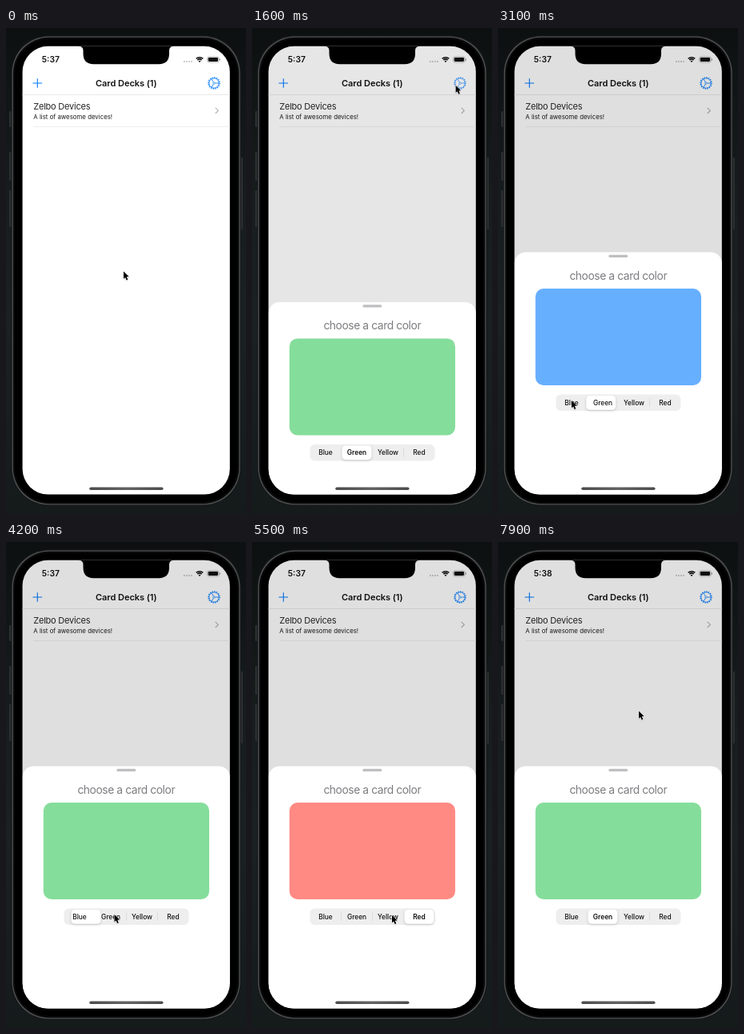
These frames come from a looping animation (300 px wide and 608 px high, 8000 ms). An HTML page with a canvas:

```html
<!DOCTYPE html>
<html lang="en">
<head>
<meta charset="utf-8">
<title>Card Decks</title>
<style>
html, body { margin: 0; width: 100%; height: 100%; overflow: hidden; background: #0c1011; }
canvas { display: block; width: 300px; height: 608px; }
</style>
</head>
<body>
<canvas id="stage"></canvas>
<script>
const W = 300, H = 608, LOOP = 8000;
const canvas = document.getElementById('stage');
const ctx = canvas.getContext('2d');
const dpr = window.devicePixelRatio || 1;
canvas.width = W * dpr;
canvas.height = H * dpr;

const BLUE = '#007aff';
const SEGMENTS = ['Blue', 'Green', 'Yellow', 'Red'];
const CARD_COLORS = ['#66afff', '#85dd9b', '#fede66', '#ff8a83'];
const SEG_LEFT = 72.5, SEG_WIDTH = 39;
const SHEET_TOP = 280.5, SHEET_START = 1426;

// [time, selected segment]
const TAPS = [[0, 1], [3050, 0], [4105, 1], [4650, 2], [5020, 3], [5750, 2], [6700, 1]];

// [time, x, y] of the pointer tip
const POINTER = [
  [0, 147, 304.5], [250, 147, 304.5], [1150, 254.8, 71.5], [1500, 254.8, 71.5],
  [1900, 253.5, 73.5], [2100, 253.5, 73.5], [2700, 92, 466], [3450, 92, 466],
  [4000, 135.5, 466], [4250, 135.5, 466], [4580, 172, 466], [4700, 172, 466],
  [4960, 208, 466], [5150, 208, 466], [5480, 175, 467], [5950, 175, 467],
  [6450, 144.3, 466.5], [7350, 144.3, 466.5], [7850, 176, 211.5], [8000, 176, 211.5]
];

const clamp = v => Math.max(0, Math.min(1, v));
const mix = (a, b, p) => a + (b - a) * p;
const ease = p => p < 0.5 ? 2 * p * p : 1 - 2 * (1 - p) * (1 - p);

function box(x, y, w, h, r, fill) {
  ctx.beginPath();
  ctx.roundRect(x, y, w, h, r);
  ctx.fillStyle = fill;
  ctx.fill();
}

function line(points, color, width = 1) {
  ctx.beginPath();
  points.forEach(([x, y]) => ctx.lineTo(x, y));
  ctx.strokeStyle = color;
  ctx.lineWidth = width;
  ctx.stroke();
}

function ring(x, y, r, width, from = 0, to = Math.PI * 2) {
  ctx.beginPath();
  ctx.arc(x, y, r, from, to);
  ctx.lineWidth = width;
  ctx.stroke();
}

function text(str, x, y, size, { weight = 400, color = '#111', align = 'left', spacing = 0 } = {}) {
  ctx.font = `${weight} ${size}px Inter, Roboto, sans-serif`;
  ctx.letterSpacing = spacing + 'px';
  ctx.textAlign = align;
  ctx.fillStyle = color;
  ctx.fillText(str, x, y);
}

function pointerAt(t) {
  const i = POINTER.findIndex(k => k[0] > t);
  const [t0, x0, y0] = POINTER[i - 1], [t1, x1, y1] = POINTER[i];
  const p = ease((t - t0) / (t1 - t0));
  return [mix(x0, x1, p), mix(y0, y1, p)];
}

// Critically damped spring from 0 to 1
function sheetProgress(t) {
  const k = Math.max(0, t - SHEET_START) * 0.0169;
  return 1 - Math.exp(-k) * (1 + k);
}

function drawBody() {
  const back = ctx.createLinearGradient(0, 0, 0, H);
  back.addColorStop(0, '#0c1011');
  back.addColorStop(0.35, '#171c1d');
  back.addColorStop(0.6, '#1b2022');
  back.addColorStop(1, '#151a1b');
  ctx.fillStyle = back;
  ctx.fillRect(0, 0, W, H);

  [[4, 104, 20], [4, 155, 36], [4, 203, 46], [292, 162, 90]]
    .forEach(([x, y, h]) => box(x, y, 4, h, 1, '#2c2f30'));

  box(6.4, 9.2, 287.4, 588.6, 47, '#161819');
  box(7.6, 10.4, 285, 586.2, 46, '#505152');
  box(8.9, 11.7, 282.4, 583.6, 45, '#090a0a');
  box(11, 14, 278.2, 579, 43, '#000');
}

function drawNotch() {
  ctx.beginPath();
  ctx.moveTo(90.5, 22);
  ctx.lineTo(91.5, 23);
  ctx.quadraticCurveTo(96.5, 23, 96.5, 28.5);
  ctx.lineTo(96.5, 32);
  ctx.quadraticCurveTo(96.5, 45.2, 109.5, 45.2);
  ctx.lineTo(191, 45.2);
  ctx.quadraticCurveTo(204, 45.2, 204, 32);
  ctx.lineTo(204, 28.5);
  ctx.quadraticCurveTo(204, 23, 209, 23);
  ctx.lineTo(210, 22);
  ctx.fillStyle = '#000';
  ctx.fill();
}

function drawStatus(t) {
  text(t < 6000 ? '5:37' : '5:38', 44.8, 43, 10.3, { weight: 600 });
  for (let i = 0; i < 4; i++) box(222 + i * 3, 41, 1.8, 1.8, 0.9, '#b4b4b4');

  ctx.strokeStyle = '#111';
  const from = -Math.PI * 0.74, to = -Math.PI * 0.26;
  ring(242, 43, 6.3, 1.5, from, to);
  ring(242, 43, 3.9, 1.5, from, to);
  ring(242, 43, 1.1, 2, from, to);

  ctx.strokeStyle = '#999';
  ctx.lineWidth = 0.7;
  ctx.beginPath();
  ctx.roundRect(251.6, 36, 14.6, 7, 2.2);
  ctx.stroke();
  box(252.7, 37.1, 12.4, 4.8, 1.3, '#111');
  box(266.9, 38.3, 1, 2.4, 0.5, '#999');
}

function drawGear(alpha) {
  ctx.save();
  ctx.translate(260, 69);
  ctx.globalAlpha = alpha;
  ctx.strokeStyle = BLUE;
  const tooth = Math.PI * 2 * 7.1 / 32;
  ctx.setLineDash([tooth, tooth]);
  ring(0, 0, 7.1, 1.2);
  ctx.setLineDash([]);
  ring(0, 0, 6.2, 0.9);
  ring(0, 0, 1.3, 0.6);
  for (let i = 0; i < 3; i++) {
    const a = i * Math.PI * 2 / 3, c = Math.cos(a), s = Math.sin(a);
    line([[c * 1.4, s * 1.4], [c * 6, s * 6]], BLUE, 0.8);
  }
  ctx.restore();
}

function drawList(t) {
  ctx.fillStyle = '#fff';
  ctx.fillRect(20, 22, 262, 563);
  drawStatus(t);

  line([[33.5, 69], [45.1, 69]], BLUE, 1.1);
  line([[39.3, 63.2], [39.3, 74.8]], BLUE, 1.1);
  text('Card Decks (1)', 150.3, 73, 11, { weight: 600, align: 'center', spacing: -0.03 });
  const press = clamp((t - 1230) / 60);
  const release = clamp((t - 1400) / 300);
  drawGear(1 - 0.7 * press * (1 - release));

  line([[20, 83.5], [281, 83.5]], '#e9e9ea');
  text('Zelbo Devices', 34.3, 102, 11, { color: '#262626', spacing: -0.23 });
  text('A list of awesome devices!', 34.3, 113.8, 7.8, { color: '#1c1c1c', spacing: 0.02 });
  line([[261.7, 99.8], [265.3, 103.4], [261.7, 107]], '#b5b5b8', 1.2);
  line([[34, 123.5], [281, 123.5]], '#efeff0');
}

function drawPicker(y, t) {
  const index = TAPS.findLastIndex(tap => tap[0] <= t);
  const [tapTime, current] = TAPS[index];
  const previous = index ? TAPS[index - 1][1] : current;
  const slide = ease(clamp((t - tapTime) / 300));
  const place = mix(previous, current, slide);

  box(46.8, y + 45.5, 207.2, 121, 10, CARD_COLORS[current]);
  box(SEG_LEFT, y + 178, SEG_WIDTH * 4, 20.5, 6, '#eeeeef');

  for (let i = 1; i < 4; i++) {
    const x = SEG_LEFT + i * SEG_WIDTH;
    if (Math.abs(i - 0.5 - place) > 0.85) {
      line([[x, y + 183], [x, y + 193.5]], '#d6d6d9', 0.8);
    }
  }

  ctx.save();
  ctx.shadowColor = 'rgba(0,0,0,.2)';
  ctx.shadowBlur = 3 * dpr;
  ctx.shadowOffsetY = dpr;
  box(SEG_LEFT + place * SEG_WIDTH + 1, y + 179.3, SEG_WIDTH - 2, 18, 4.7, '#fff');
  ctx.restore();

  SEGMENTS.forEach((name, i) => {
    const weight = i === current && slide > 0.5 ? 600 : 500;
    text(name, SEG_LEFT + (i + 0.5) * SEG_WIDTH, y + 191.3, 8.4, { weight, align: 'center' });
  });
}

function drawSheet(t) {
  const p = sheetProgress(t);
  if (p <= 0) return;
  ctx.fillStyle = `rgba(0,0,0,${0.125 * p})`;
  ctx.fillRect(20, 22, 262, 563);

  const y = mix(584, SHEET_TOP, p);
  box(20.6, y, 259.4, 340, 14, '#fff');
  box(138.3, y + 3.3, 24, 3.2, 1.6, '#bfbfc2');
  text('choose a card color', 150.3, y + 34.2, 13.8, { color: '#7c7c80', align: 'center', spacing: -0.4 });
  drawPicker(y, t);
}

function drawHomeBar() {
  const shade = ctx.createLinearGradient(104, 0, 197, 0);
  shade.addColorStop(0, '#4c4c4c');
  shade.addColorStop(0.5, '#626262');
  shade.addColorStop(1, '#4c4c4c');
  box(104.3, 574.6, 92.2, 3.4, 1.7, shade);
}

function drawPointer(t) {
  const [x, y] = pointerAt(t);
  ctx.save();
  ctx.translate(x, y);
  ctx.scale(0.88, 0.88);
  ctx.beginPath();
  [[0, 0], [0, 10.6], [2.4, 8.5], [4.1, 12.4], [6, 11.6], [4.3, 7.8], [7.5, 7.5]]
    .forEach(([px, py]) => ctx.lineTo(px, py));
  ctx.closePath();
  ctx.lineJoin = 'round';
  ctx.lineWidth = 1.1;
  ctx.strokeStyle = '#fff';
  ctx.shadowColor = 'rgba(0,0,0,.2)';
  ctx.shadowBlur = 1.5 * dpr;
  ctx.shadowOffsetY = 0.7 * dpr;
  ctx.stroke();
  ctx.shadowColor = 'transparent';
  ctx.fillStyle = '#000';
  ctx.fill();
  ctx.restore();
}

function draw(t) {
  ctx.setTransform(dpr, 0, 0, dpr, 0, 0);
  drawBody();
  ctx.save();
  ctx.beginPath();
  ctx.roundRect(20.6, 22.8, 259.2, 560.8, 32);
  ctx.clip();
  drawList(t);
  drawSheet(t);
  drawHomeBar();
  drawNotch();
  ctx.restore();
  drawPointer(t);
}

const start = performance.now();
function tick() {
  draw((performance.now() - start) % LOOP);
  requestAnimationFrame(tick);
}
tick();
</script>
</body>
</html>
```
